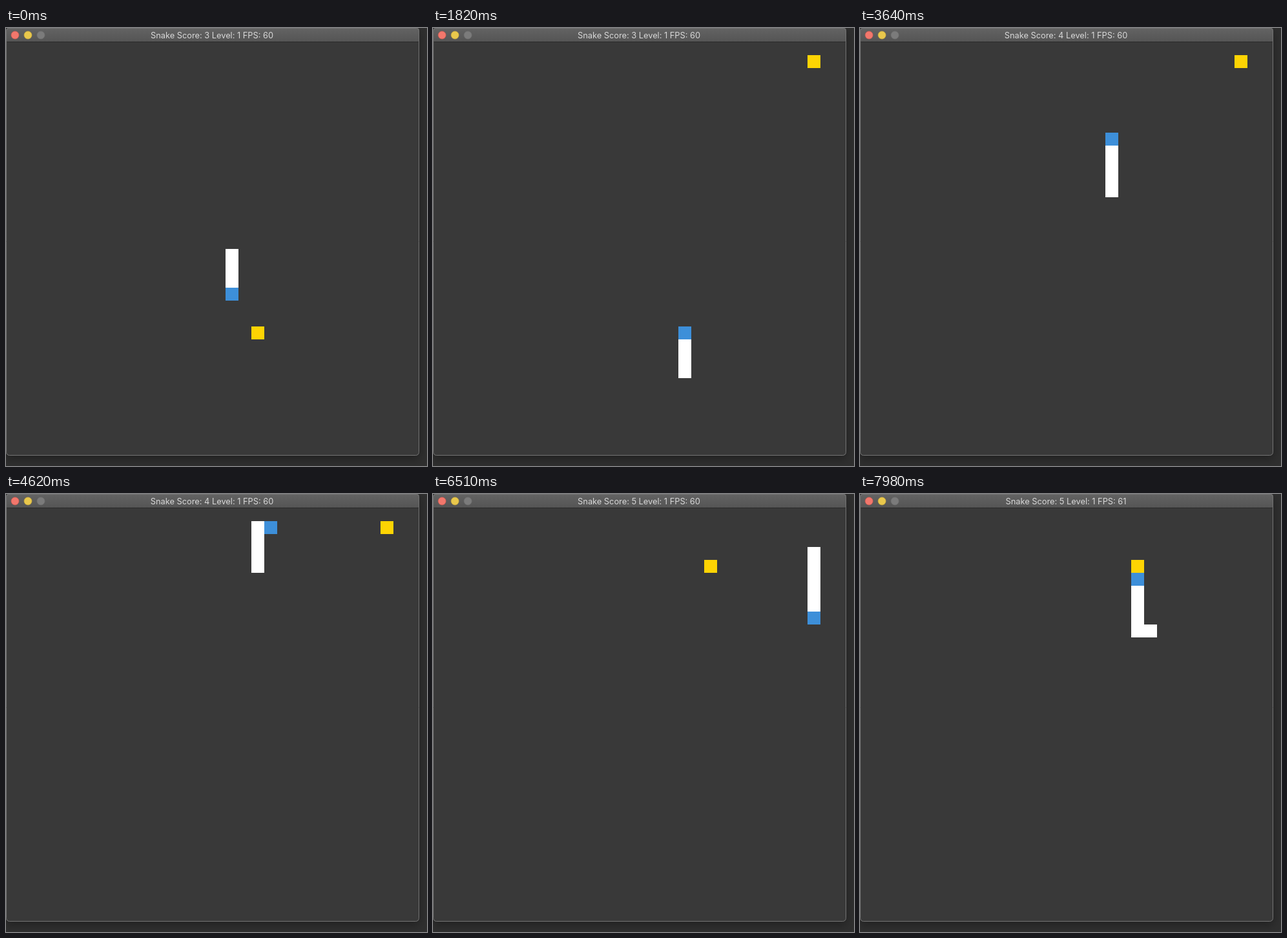
Animation, 652 px wide and 678 px high, one loop 8000 ms. Source, as an HTML page with a canvas:

```html
<!DOCTYPE html>
<html lang="en">
<head>
<meta charset="utf-8">
<title>Snake</title>
<style>
  html, body { margin: 0; width: 100%; height: 100%; overflow: hidden; background: #2f2f2f; }
  canvas { display: block; }
</style>
</head>
<body>
<canvas id="stage" width="652" height="678"></canvas>
<script>
const ctx = document.getElementById('stage').getContext('2d');
const LOOP = 8000, CELL = 20, TOP = 22;

// Head route: starting cell, then direction and number of cells.
const START = [17, 16];
const ROUTE = 'D5 R4 D4 L2 U24 R10 D8 L8 U4';
const DIRS = { U: [0, -1], D: [0, 1], L: [-1, 0], R: [1, 0] };
const path = [START];
for (const leg of ROUTE.split(' ')) {
  const [dx, dy] = DIRS[leg[0]];
  for (let n = +leg.slice(1); n > 0; n--) {
    const [x, y] = path[path.length - 1];
    path.push([x + dx, y + dy]);
  }
}

// [step, ms]: the game slows down a little in the middle.
const PACE = [[0, 9], [24, 2846], [38, 4660], [66, 7970]];
const FOODS = [[19, 22], [29, 1], [21, 4]];
const MEALS = [15, 46];
const TITLE_PHASE = 670;

function stepAt(t) {
  const i = Math.max(1, PACE.findIndex(([, ms], n) => n === PACE.length - 1 || t < ms));
  const [k0, t0] = PACE[i - 1], [k1, t1] = PACE[i];
  const step = Math.floor(k0 + (t - t0) / (t1 - t0) * (k1 - k0) + 1e-6);
  return Math.min(66, Math.max(0, step));
}

const mealsBefore = step => MEALS.filter(meal => meal < step).length;
const mealsUntil = step => MEALS.filter(meal => meal <= step).length;

function drawCell([x, y], color) {
  ctx.fillStyle = color;
  ctx.fillRect(x * CELL, y * CELL + TOP, CELL, CELL);
}

function drawButton(x, color, rim) {
  ctx.beginPath();
  ctx.arc(x, 11, 6, 0, 7);
  ctx.fillStyle = color;
  ctx.fill();
  ctx.lineWidth = 0.6;
  ctx.strokeStyle = rim;
  ctx.stroke();
}

function drawWindow(title) {
  ctx.fillStyle = '#2f2f2f';
  ctx.fillRect(0, 0, 652, 678);

  ctx.save();
  ctx.shadowColor = 'rgba(0,0,0,.3)';
  ctx.shadowBlur = 14;
  ctx.shadowOffsetY = 5;
  ctx.beginPath();
  ctx.roundRect(0, 0, 640, 662, [4, 4, 5, 5]);
  ctx.fillStyle = '#393939';
  ctx.fill();
  ctx.restore();

  ctx.save();
  ctx.clip();
  const bar = ctx.createLinearGradient(0, 0, 0, 21);
  bar.addColorStop(0, '#636363');
  bar.addColorStop(1, '#555555');
  ctx.fillStyle = bar;
  ctx.fillRect(0, 0, 640, 21);
  ctx.fillStyle = '#2b2b2b';
  ctx.fillRect(0, 21, 640, 1);
  ctx.restore();

  ctx.beginPath();
  ctx.roundRect(0.5, 0.5, 639, 661, [4, 4, 5, 5]);
  ctx.lineWidth = 1;
  ctx.strokeStyle = '#747474';
  ctx.stroke();

  drawButton(14, '#f2776c', '#d9584e');
  drawButton(34, '#e9c84c', '#cfae38');
  drawButton(54, '#7b7b7b', '#727272');

  ctx.font = '12.8px Inter, Roboto, sans-serif';
  ctx.textAlign = 'center';
  ctx.textBaseline = 'alphabetic';
  ctx.fillStyle = '#d8d8d8';
  ctx.fillText(title, 319, 16);
}

function draw(now) {
  const t = now % LOOP;
  const step = stepAt(t);

  // The title refreshes once a second.
  const refreshed = Math.floor((t - TITLE_PHASE) / 1000) * 1000 + TITLE_PHASE;
  const score = 3 + mealsUntil(stepAt(refreshed));
  const fps = refreshed >= 6000 + TITLE_PHASE ? 61 : 60;
  drawWindow(`Snake Score: ${score} Level: 1 FPS: ${fps}`);

  const head = step + 3;
  const length = 4 + mealsBefore(step);
  drawCell(FOODS[mealsUntil(step)], '#fed403');
  for (let i = head - length + 1; i < head; i++) drawCell(path[i], '#ffffff');
  drawCell(path[head], '#3d8fd9');
}

const began = performance.now();
function tick() {
  draw(performance.now() - began);
  requestAnimationFrame(tick);
}
tick();
</script>
</body>
</html>
```
